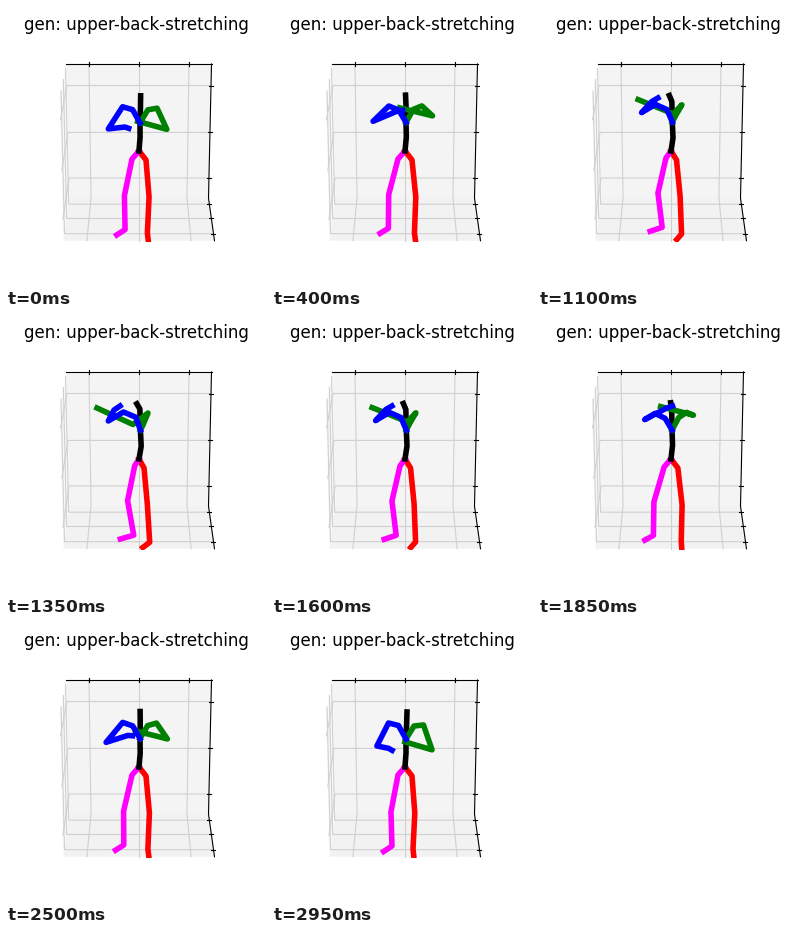
A matplotlib script for the animation above (3 s loop, 260 px wide and 280 px high).

```python
import numpy as np
import matplotlib.pyplot as plt
from matplotlib.animation import FuncAnimation

W, H, DPI = 260, 280, 100
STEP, FRAMES = 50, 60
PEAK = 1350     # ms, furthest point of the stretch
CENTER = 133    # x of the vanishing axis
FLOOR = 235.5   # lower edge of the plot area

plt.rcParams["font.family"] = "DejaVu Sans"

# Three key poses per limb: arms low, arms raised, upper body turned.
PELVIS = (133, 145)
CHEST = [(134, 117), (134, 116), (134.4, 116)]

LEFT_LEG = [
    [PELVIS, (140, 154), (142.8, 191), (141, 227), (141.7, 233.5)],
    [PELVIS, (140, 154), (144.3, 191), (143.2, 227), (144.2, 233.5)],
    [PELVIS, (138, 154), (141.3, 189.7), (143.7, 228.3), (136.8, 233.5)],
]
RIGHT_LEG = [
    [PELVIS, (126, 153), (119, 190), (120, 224), (111.7, 229.5)],
    [PELVIS, (126, 153), (115.5, 188), (114.5, 221.5), (106.3, 226.2)],
    [PELVIS, (128.7, 151.7), (121.6, 186.7), (127.7, 221.2), (114.4, 225)],
]
SPINE = [
    [PELVIS, (134, 131), CHEST[0], (134.6, 103), (135, 90)],
    [PELVIS, (134.5, 131), CHEST[1], (133.7, 97), (132.8, 88.7)],
    [PELVIS, (135.2, 132.3), CHEST[2], (133.9, 95), (130.8, 89.8)],
]
LEFT_ARM = [
    [CHEST[0], (142, 104), (151.5, 103), (160, 128), (133, 120)],
    [CHEST[1], (141, 103), (149, 98.3), (157.5, 100.5), (125, 92.5)],
    [CHEST[2], (137, 111), (142, 99), (127, 110.5), (91, 94)],
]
RIGHT_ARM = [
    [CHEST[0], (126.5, 103.5), (116.5, 101), (105, 124), (116.5, 126.5), (120, 128.5)],
    [CHEST[1], (127, 104.5), (117, 99.5), (107, 105.5), (130, 94), (136, 92)],
    [CHEST[2], (129.7, 103.2), (117.5, 98), (102.3, 107), (108, 96), (114, 92)],
]

# Limb, colour, and how far the elbow swings out while the arm rises.
LIMBS = [
    (LEFT_LEG, "red", (0, 0)),
    (RIGHT_LEG, "magenta", (0, 0)),
    (SPINE, "black", (0, 0)),
    (LEFT_ARM, "green", (2.5, 0)),
    (RIGHT_ARM, "blue", (-6, 4)),
]


def ease(x):
    x = np.clip(x, 0, 1)
    return x * x * (3 - 2 * x)


def pose(keys, swing, t):
    low, up, turned = np.array(keys, float)
    away = abs(t - PEAK)
    lift = ease((1650 - away) / 1150)
    twist = ease((580 - away) / 500)
    joints = low + lift * (up - low) + twist * (turned - up)
    joints[3] += np.sin(np.pi * lift) * np.array(swing)
    return joints


def project(x, drop, near):
    """Perspective view of the box: x in -1..1, drop and near in 0..1."""
    w = 0.013793 + 0.000595 * drop - 0.001142 * near
    return CENTER + x / w, (0.8 + 1.9626 * drop + 0.347 * near) / w


fig = plt.figure(figsize=(W / DPI, H / DPI), dpi=DPI, facecolor="white")
ax = fig.add_axes([0, 0, 1, 1])
ax.set(xlim=(0, W), ylim=(H, 0))
ax.axis("off")


def pane(color, *corners):
    ax.fill(*zip(*(project(*c) for c in corners)), color=color, lw=0, zorder=0)


def stroke(points, color="black", z=3):
    ax.plot(*zip(*points), color=color, lw=0.8, zorder=z)


def grid(*corners):
    stroke([project(*c) for c in corners], "#d0d0d0", 1)


def tick(corner, dx, dy):
    x, y = project(*corner)
    stroke([(x - dx, y - dy), (x + dx, y + dy)])


def draw_box():
    pane("#f8f8f8", (-1, 0, 0), (-1, 1, 0), (-1, 1, 1), (-1, 0, 1))
    pane("#f4f4f4", (-1, 0, 0), (1, 0, 0), (1, 1, 0), (-1, 1, 0))
    pane("#f2f2f2", (-1, 1, 0), (1, 1, 0), (1, 1, 1), (-1, 1, 1))

    for k in (-1, 0, 1):
        x, v = 0.69 * k, 0.5 + 0.345 * k
        grid((x, 0, 0), (x, 1, 0), (x, 1, 1))
        grid((-1, v, 1), (-1, v, 0), (1, v, 0))
        grid((-1, 0, v), (-1, 1, v), (1, 1, v))
        tick((x, 0, 0), 0, 2)
        tick((1, v, 0), 2, 0)
        tick((1, 1, v), 2, 0)

    stroke([project(-1, 0, 0), project(1, 0, 0)])
    stroke([project(1, 0, 0), project(1, 1, 0), project(1, 1, 1)])


draw_box()
ax.text(130.5, 24, "gen: upper-back-stretching", fontsize=12,
        ha="center", va="baseline", color="black")

clip = plt.Rectangle((0, 0), W, FLOOR, transform=ax.transData)
lines = []
for order, (_, color, _) in enumerate(LIMBS):
    line, = ax.plot([], [], color=color, lw=4, zorder=5 + order)
    line.set_clip_path(clip)
    lines.append(line)


def update(i):
    for line, (keys, _, swing) in zip(lines, LIMBS):
        line.set_data(*pose(keys, swing, i * STEP).T)
    return lines


anim = FuncAnimation(fig, update, frames=FRAMES, interval=STEP,
                     repeat=True, repeat_delay=0, blit=False)
plt.show()
```
